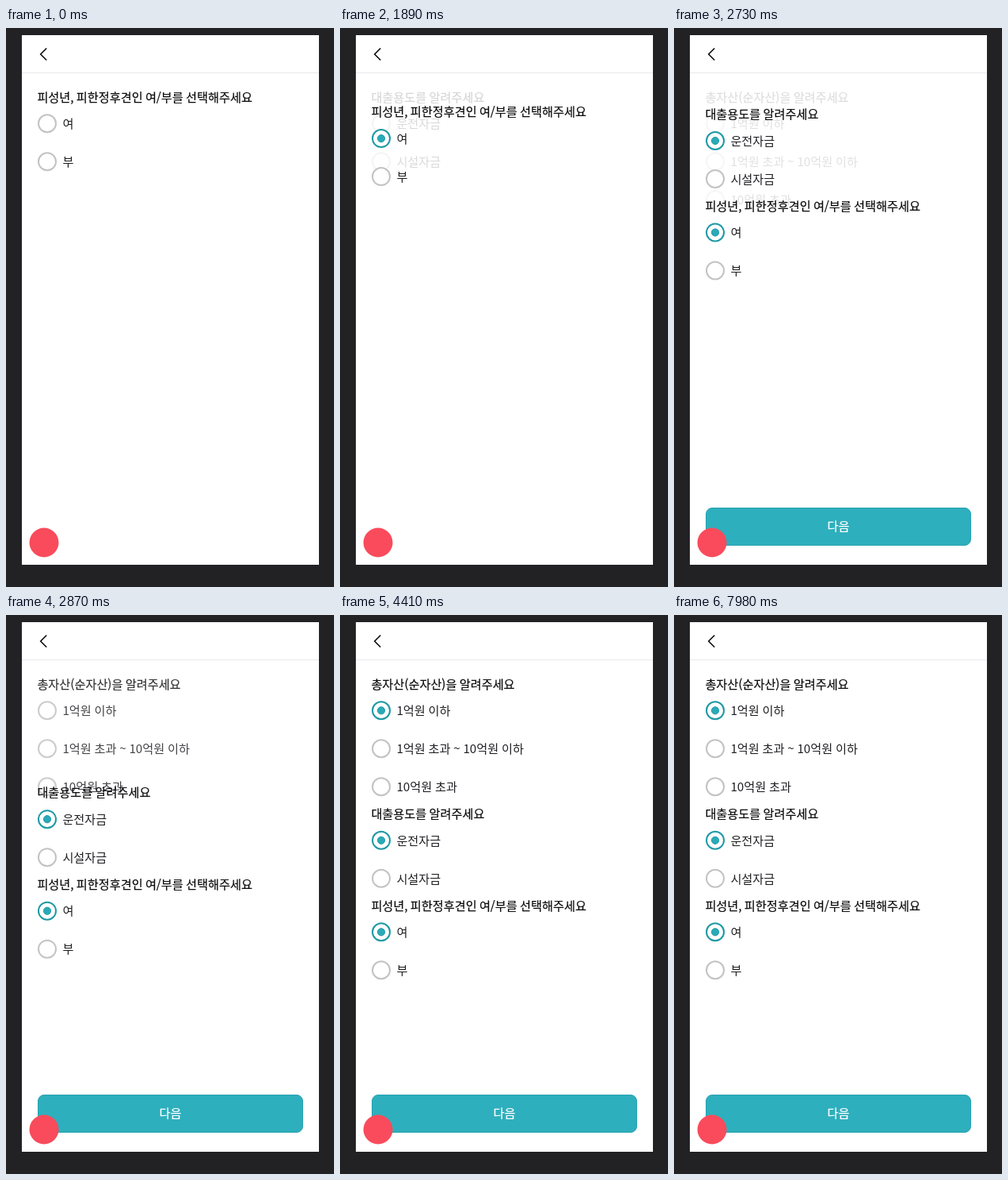
These frames come from a looping animation (414 px wide and 704 px high, 8050 ms). An HTML page:

```html
<!DOCTYPE html>
<html lang="ko">
<head>
<meta charset="utf-8">
<title>Form steps</title>
<style>
  html, body { margin: 0; width: 100%; height: 100%; overflow: hidden; background: #222224; }
  svg { display: block; width: 414px; height: 704px; }
  text {
    font: 400 15.2px "Noto Sans CJK KR", "Noto Sans CJK JP", sans-serif;
    word-spacing: -1px; fill: #0c0c0e; stroke: #0c0c0e; stroke-width: .2;
  }
  .label { fill: #202024; stroke: none; word-spacing: -.5px; }
  .ring { fill: #fff; stroke: #c3c3c5; stroke-width: 2; }
  .dot { fill: #2aaab7; stroke: #1f9ca8; visibility: hidden; }
  .on .ring { stroke: #1d99a5; }
  .on .dot { visibility: visible; }
  #next rect { fill: #2eafbd; stroke: #28a3b0; }
  #next text { fill: #fff; stroke: #fff; text-anchor: middle; }
</style>
</head>
<body>
<svg viewBox="0 0 414 704">
  <rect width="414" height="704" fill="#222224"/>
  <rect x="20" y="9" width="375" height="667" fill="#fff"/>
  <rect x="20" y="56" width="375" height="1" fill="#e9e9eb"/>
  <path d="M51.2 25.5 43.7 33l7.5 7.5" fill="none" stroke="#0c0c0e" stroke-width="1.6"/>
  <g id="form"></g>
  <g id="next">
    <rect x="40.5" y="604.5" width="334" height="47" rx="7.5"/>
    <text x="207.5" y="633.2">다음</text>
  </g>
  <circle cx="48" cy="648" r="18.5" fill="#f94b5b"/>
</svg>
<script>
const LOOP = 8050, TICK = 70, SLIDE = 300;
const ASSET_IN = 2654, PURPOSE_IN = 1806;
const form = document.getElementById('form');
const next = document.getElementById('next');

function addGroup(title, labels) {
  const options = labels.map((label, i) => `
    <g class="option" transform="translate(0 ${i * 48})">
      <circle class="ring" cx="52" cy="120.3" r="11"/>
      <circle class="dot" cx="52" cy="120.3" r="4.6"/>
      <text class="label" x="71.4" y="126">${label}</text>
    </g>`).join('');
  form.insertAdjacentHTML('beforeend', `<g><text x="39.4" y="92.6">${title}</text>${options}</g>`);
  const el = form.lastElementChild;
  return { el, options: [...el.querySelectorAll('.option')] };
}

const asset = addGroup('총자산(순자산)을 알려주세요', ['1억원 이하', '1억원 초과 ~ 10억원 이하', '10억원 초과']);
const purpose = addGroup('대출용도를 알려주세요', ['운전자금', '시설자금']);
const guardian = addGroup('피성년, 피한정후견인 여/부를 선택해주세요', ['여', '부']);

// cubic-bezier(.42, 0, .58, 1)
function easeInOut(x) {
  if (x <= 0 || x >= 1) return x <= 0 ? 0 : 1;
  let lo = 0, hi = 1, s;
  for (let i = 0; i < 24; i++) {
    s = (lo + hi) / 2;
    const bx = 1.26 * s * (1 - s) ** 2 + 1.74 * s * s * (1 - s) + s ** 3;
    if (bx < x) lo = s; else hi = s;
  }
  return s * s * (3 - 2 * s);
}

function place(group, y, opacity) {
  group.el.setAttribute('transform', `translate(0 ${y.toFixed(2)})`);
  group.el.setAttribute('opacity', opacity);
}

function select(group, index) {
  group.options.forEach((el, i) => el.classList.toggle('on', i === index));
}

function render(t) {
  const p = easeInOut((t - PURPOSE_IN) / SLIDE);
  const a = easeInOut((t - ASSET_IN) / SLIDE);
  place(asset, 0, a);
  place(purpose, 163.5 * a, p);
  place(guardian, 115.5 * p + 163.5 * a, 1);
  select(guardian, t >= 1820 ? 0 : -1);
  select(purpose, t >= 2730 ? 0 : -1);
  select(asset, t < 3780 ? -1 : t >= 5180 && t < 5740 ? 1 : 0);
  next.style.display = t >= 2730 ? '' : 'none';
}

const start = performance.now();
function frame() {
  const t = (performance.now() - start) % LOOP;
  render(Math.floor(t / TICK) * TICK);
  requestAnimationFrame(frame);
}
render(0);
requestAnimationFrame(frame);
</script>
</body>
</html>
```
